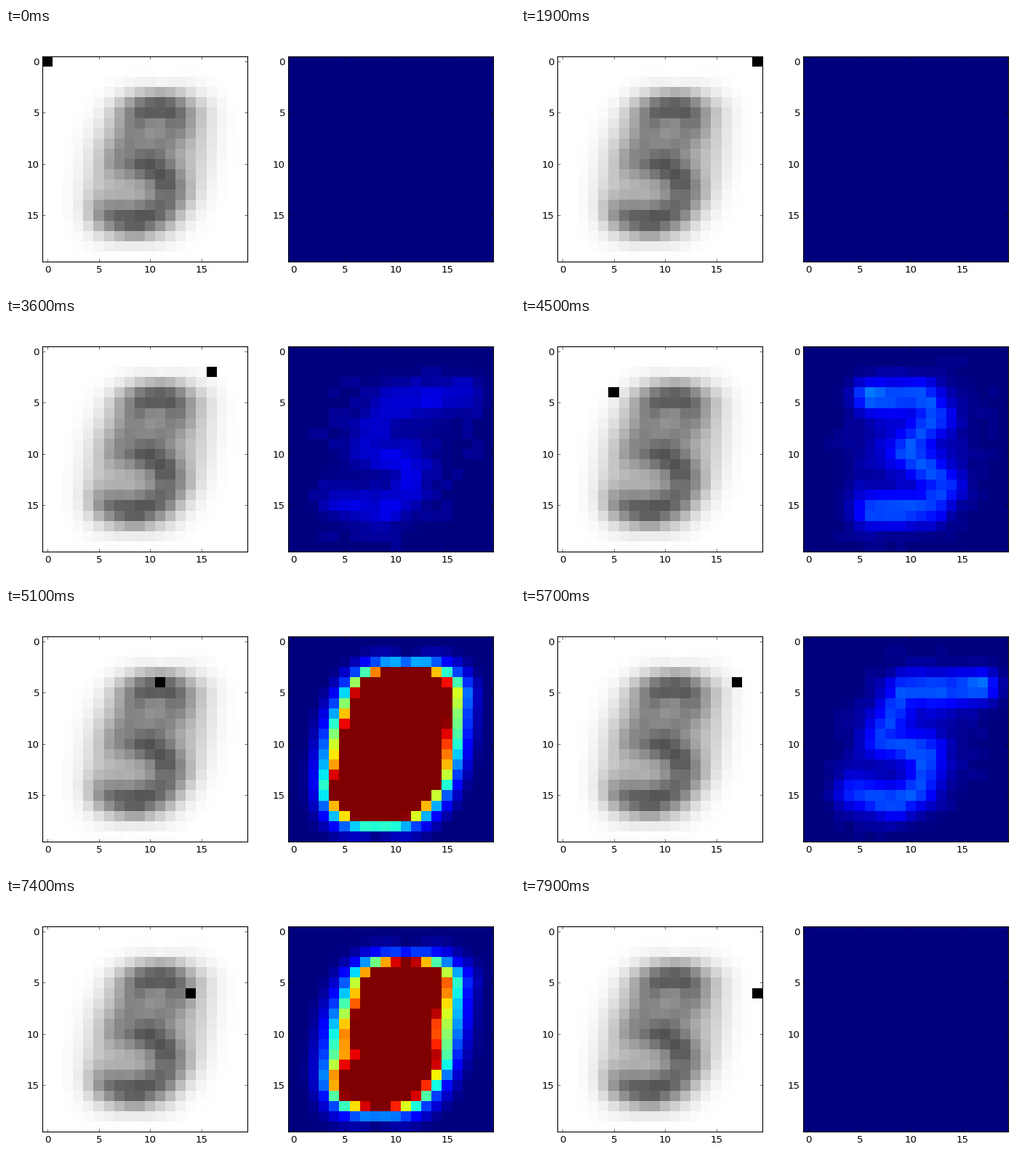
Recreate the animation shown at these times as a matplotlib script. Size 700x360 px, loop 8000 ms.

```python
import numpy as np
import matplotlib.pyplot as plt
from matplotlib.animation import FuncAnimation

W, H, DPI, N = 700, 360, 80, 20
FRAMES, STEP = 80, 100
TOP, SIZE = 38.8, 281.8
LEAN = 0.17
VMAX = 0.115

plt.rcParams.update({
    "font.family": "DejaVu Sans", "font.size": 12, "savefig.dpi": DPI,
    "axes.linewidth": 1.0, "xtick.top": True, "ytick.right": True,
})

rows, cols = np.mgrid[0:N, 0:N].astype(float)


def sig(v):
    return 1 / (1 + np.exp(-v))


def stroke(points, lean=0, width=1.1):
    """Soft brush along a polyline, slanted by lean."""
    pts = [(x - lean * (y - 10), y) for x, y in points]
    dist = np.full((N, N), np.inf)
    for (x0, y0), (x1, y1) in zip(pts, pts[1:]):
        dx, dy = x1 - x0, y1 - y0
        t = ((cols - x0) * dx + (rows - y0) * dy) / (dx * dx + dy * dy)
        t = np.clip(t, 0, 1)
        dist = np.minimum(dist, np.hypot(cols - x0 - t * dx, rows - y0 - t * dy))
    return np.exp(-(dist / width) ** 2 / 2)


def blob():
    """Soft slanted superellipse that holds all the ink."""
    dy = rows - 10.1
    u = np.abs(cols - 9.75 + LEAN * dy) / 5.4
    v = np.abs(dy) / 7.4
    r = (u ** 2.4 + v ** 2.4) ** (1 / 2.4)
    return sig((1 - r) / (0.05 + 0.1 * u / r))


THREE = [(6, 4.4), (11, 4.2), (12.3, 6.5), (9.5, 9.7),
         (13.7, 13), (12.2, 15.3), (6, 15.6)]
FIVE = [(17, 4.4), (9.5, 4.8), (6.8, 9.6), (11.6, 10.8),
        (11, 14), (8.5, 15.8), (4.3, 14.5)]

three, five = stroke(THREE), stroke(FIVE)
mean = blob() * (0.29 + 0.2 * (stroke(THREE, LEAN) + five))
mean = np.clip(mean - 0.004, 0, 1)


def probe(i):
    """The probed cell scans every second row."""
    return i % N, 2 * (i // N)


def joint(i):
    """How strongly every cell goes together with the probed one."""
    x, y = probe(i)
    m = mean[y, x]
    a, b = three[y, x] + 1e-6, five[y, x] + 1e-6
    digit = (a * three + b * five) / (a + b)
    near = np.exp(-((cols - x) ** 2 + (rows - y) ** 2) / 5)
    given = (0.4 * mean + 0.5 * digit) * (1 + 0.8 * near)
    mix = 1 / (1 + (m / 0.15) ** 4)
    level = m * (mix * given + (1 - mix) * mean) / VMAX

    r = np.random.default_rng(i).random((N, N))
    r = (r + np.roll(r, 1, axis=1)) / 2
    speckle = (r > 0.6) & (mean > 0.004)
    return level + 0.025 * speckle * m / (m + 0.0005) * np.exp(-m / 0.05)


def marked(i):
    x, y = probe(i)
    img = mean.copy()
    img[y, x] = 1
    return img


def panel(left, img, cmap):
    ax = fig.add_axes([left / W, 1 - (TOP + SIZE) / H, SIZE / W, SIZE / H])
    im = ax.imshow(img, cmap=cmap, vmin=0, vmax=1,
                   interpolation="nearest", aspect="auto")
    ax.set_xticks(range(0, N, 5))
    ax.set_yticks(range(0, N, 5))
    ax.tick_params(direction="in", length=4, width=0.5, pad=4)
    ax.tick_params(axis="x", pad=5)
    return im


fig = plt.figure(figsize=(W / DPI, H / DPI), dpi=DPI, facecolor="white")
average = panel(50.4, marked(0), "binary")
heat = panel(388.4, joint(0), "jet")


def draw(i):
    average.set_data(marked(i))
    heat.set_data(joint(i))
    return average, heat


anim = FuncAnimation(fig, draw, frames=FRAMES, interval=STEP,
                     repeat=True, repeat_delay=0, blit=False)
plt.show()
```
